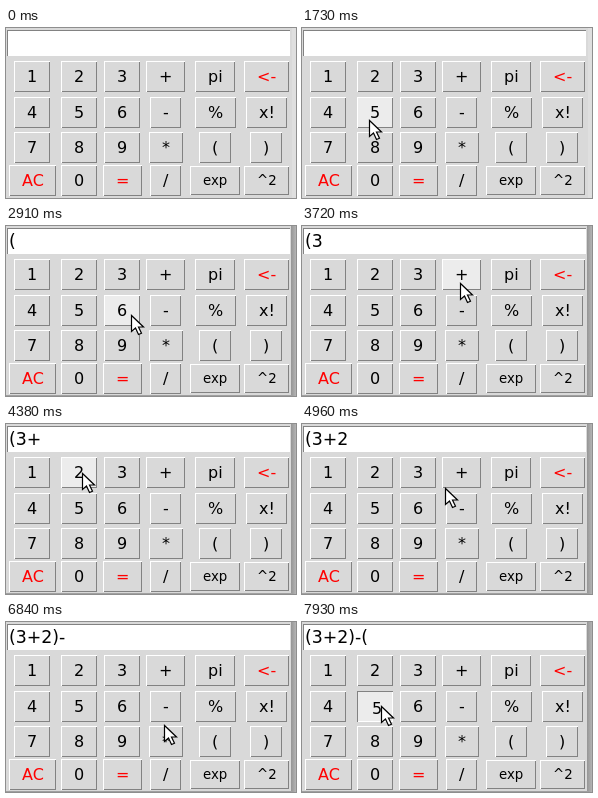
These frames come from a looping animation (290x170 px, 7990 ms). An HTML page with a canvas:

```html
<!DOCTYPE html>
<html lang="en">
<head>
<meta charset="utf-8">
<title>Calculator</title>
<style>
html, body { margin: 0; width: 290px; height: 170px; overflow: hidden; background: #d9d9d9; }
canvas { display: block; }
</style>
</head>
<body>
<canvas id="stage" width="290" height="170"></canvas>
<script>
const ctx = document.getElementById('stage').getContext('2d');
const LOOP = 7990;
const FACE = '#d9d9d9', ACTIVE = '#ececec', DARK = '#828282';
const PT = 96 / 72;

const ROWS = ['1 2 3 + pi <-', '4 5 6 - % x!', '7 8 9 * ( )', 'AC 0 = / exp ^2'];
const COL_X = [26.5, 73.5, 116.5, 160, 209.5, 260.5];
const ROW_Y = [33, 69, 104, 137];
const RED = ['AC', '=', '<-'];
const SMALL = ['exp', '^2'];

function setFont(points) {
  ctx.font = points * PT + 'px "DejaVu Sans", sans-serif';
}

// Each button is as wide as its label plus padding, centred in its column.
function makeButton(label, row, col) {
  const small = SMALL.includes(label), points = small ? 10 : 12;
  setFont(points);
  const textW = ctx.measureText(label).width;
  const w = Math.round(textW + 25.6), h = small ? 29 : 31;
  const x = Math.floor(COL_X[col] - w / 2), y = ROW_Y[row] + (small ? 1 : 0);
  return {
    label, points, x, y, w, h,
    textX: Math.round(x + (w - textW) / 2),
    base: ROW_Y[row] + (small ? 20 : 21),
    color: RED.includes(label) ? '#f00' : '#000'
  };
}

const buttons = ROWS.flatMap((line, r) => line.split(' ').map((label, c) => makeButton(label, r, c)));

// The pointer's journey: key points, and visits that click a button before leaving.
const path = [], clicks = [];

function pass(t, x, y) { path.push({ t, x, y }); }

function visit(label, arrive, leave, dx, dy) {
  const b = buttons.find(b => b.label === label);
  const x = b.x + b.w / 2 + dx, y = b.y + b.h / 2 + dy;
  pass(arrive, x, y);
  pass(leave, x, y);
  clicks.push({ label, down: leave - 180, up: leave - 60 });
}

pass(1180, 64, 28);
pass(1220, 66, 34);
pass(1330, 66, 34);
pass(1530, 51, 60);
pass(1730, 67, 92);
pass(1830, 67, 92);
visit('(', 2310, 2530, -5, -4);
pass(2910, 125, 89);
visit('3', 3120, 3390, -1, 4);
pass(3560, 136, 76);
visit('+', 3720, 4010, -1.5, 8.5);
visit('2', 4380, 4620, 3, 0);
pass(4960, 143, 64);
visit(')', 5320, 5620, -3, 0);
pass(5900, 204, 98);
visit('-', 6160, 6440, -12.5, -.5);
pass(6720, path.at(-1).x, path.at(-1).y);
pass(6840, 158, 103);
visit('(', 7000, 7400, 0, -6);
visit('5', 7780, 8110, 6, -.5);

// Speed at a key point: zero at rests, otherwise that of a smooth curve.
function slope(i, axis) {
  const a = path[i - 1], b = path[i], c = path[i + 1];
  const same = (p, q) => p.x === q.x && p.y === q.y;
  if (!a || !c || same(a, b) || same(b, c)) return 0;
  return (c[axis] - a[axis]) / (c.t - a.t);
}

function pointer(t) {
  if (t < path[0].t) return null;
  const i = path.findLastIndex(p => p.t <= t);
  const p = path[i], q = path[i + 1], d = q.t - p.t;
  const u = (t - p.t) / d, v = 1 - u;
  const at = k => Math.round(
    p[k] * v * v * (1 + 2 * u) + q[k] * u * u * (3 - 2 * u) +
    d * u * v * (slope(i, k) * v - slope(i + 1, k) * u));
  return { x: at('x'), y: at('y') };
}

function rect(color, x, y, w, h) {
  ctx.fillStyle = color;
  ctx.fillRect(x, y, w, h);
}

function bevel(x, y, w, h, fill, sunken) {
  const lit = sunken ? DARK : '#fff';
  rect(sunken ? '#fff' : DARK, x, y, w, h);
  rect(lit, x, y, w, 1);
  rect(lit, x, y, 1, h);
  rect(fill, x + 1, y + 1, w - 2, h - 2);
}

function drawPointer({ x, y }) {
  const pts = [[0, 0], [0, 16], [4, 12.5], [7, 19], [10, 17.7], [7, 11.5], [12, 11.5]];
  ctx.beginPath();
  for (const [dx, dy] of pts) ctx.lineTo(x + .5 + dx, y + .5 + dy);
  ctx.closePath();
  ctx.fillStyle = '#fff';
  ctx.fill();
  ctx.strokeStyle = '#000';
  ctx.lineWidth = 1.2;
  ctx.stroke();
}

function drawButton(b, hover, down) {
  const shift = down ? 2 : 0;
  bevel(b.x, b.y, b.w, b.h, hover ? ACTIVE : FACE, down);
  setFont(b.points);
  ctx.fillStyle = b.color;
  ctx.fillText(b.label, b.textX + shift, b.base + shift);
}

// The window's right and lower edge darken once it has the focus.
function drawEdge(focused) {
  if (!focused) {
    rect('#dfdfdf', 286, 0, 4, 170);
    return;
  }
  const g = ctx.createLinearGradient(285, 0, 290, 0);
  g.addColorStop(0, '#959595');
  g.addColorStop(1, '#b4b4b4');
  rect(g, 285, 0, 5, 170);
  rect('#a0a0a0', 0, 169, 286, 1);
}

function drawEntry(text) {
  bevel(1, 2, 283, 26, '#fff', true);
  setFont(13);
  ctx.fillStyle = '#000';
  ctx.fillText(text, 3, 21);
}

function draw(t) {
  const tip = pointer(t);
  const pressed = clicks.some(c => t >= c.down && t < c.up);

  rect(FACE, 0, 0, 290, 170);
  drawEdge(t >= clicks[0].down);
  drawEntry(clicks.filter(c => t >= c.up).map(c => c.label).join(''));
  for (const b of buttons) {
    const hover = tip && tip.x >= b.x && tip.x < b.x + b.w && tip.y >= b.y && tip.y < b.y + b.h;
    drawButton(b, hover, hover && pressed);
  }
  if (tip) drawPointer(tip);
}

let begin;
function tick(now) {
  begin ??= now;
  draw((now - begin) % LOOP);
  requestAnimationFrame(tick);
}
draw(0);
requestAnimationFrame(tick);
</script>
</body>
</html>
```
